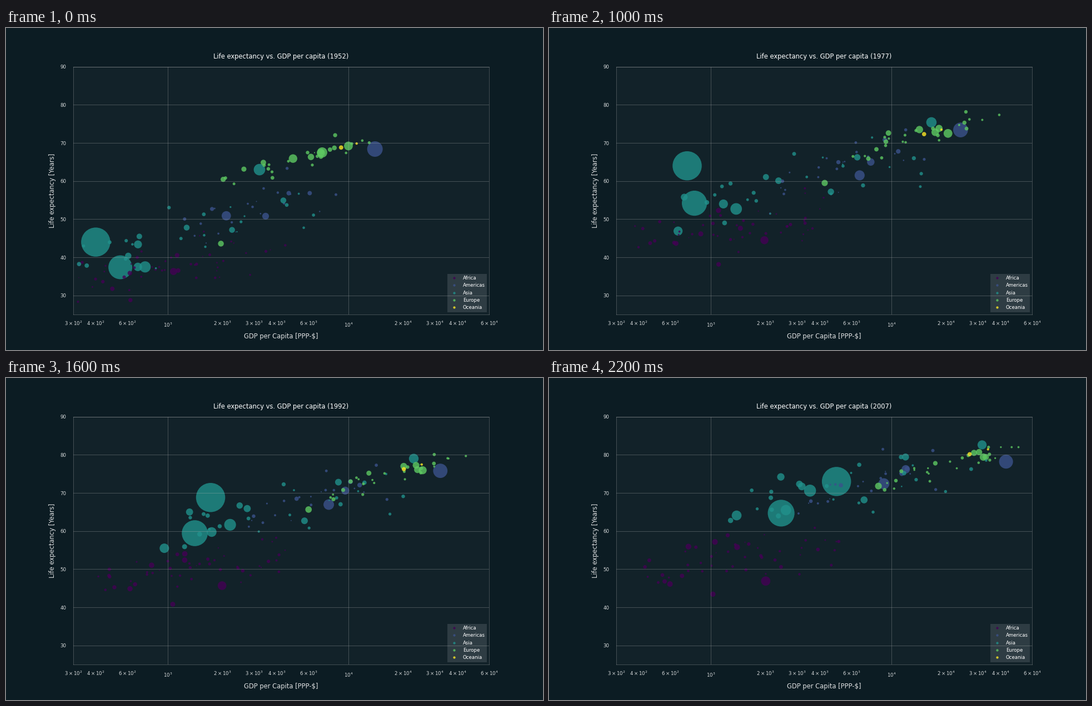
Recreate the animation shown at these times as a matplotlib script. Size 966 by 580 pixels, loop 2.4 s.

```python
import numpy as np
import matplotlib.pyplot as plt
from matplotlib.animation import FuncAnimation
from matplotlib.lines import Line2D
from matplotlib.ticker import FixedLocator, FuncFormatter

W, H, DPI = 966, 580, 69
STEPS = 12
MAX_AREA = 3000
ALPHA = 0.8
NAMES = ["Africa", "Americas", "Asia", "Europe", "Oceania"]
AF, AM, AS, EU, OC = range(5)
COLORS = plt.get_cmap("viridis")(np.linspace(0, 1, 5))

t = np.arange(STEPS)
largest = np.geomspace(556, 1319, STEPS)
group, xs, ys, areas = [], [], [], []


def track(kind, pops, income, age, knots=(0, 5, 11)):
    """Add a bubble whose log income and age run straight between knots."""
    group.append(kind)
    xs.append(10 ** np.interp(t, knots, np.log10(income)))
    ys.append(np.interp(t, knots, age))
    areas.append(MAX_AREA * np.geomspace(*pops, STEPS) / largest)


def cloud(kind, count, pop, growth, income, spread, age, slope, noise):
    """Scatter small bubbles around a drifting centre; richer means older."""
    rank = rng.permutation(np.linspace(-1.8, 1.8, count))
    for z in rank:
        start = pop * np.exp(np.clip(rng.normal(0, 0.9), -2, 1.5))
        drift = rng.normal(0, 0.3, 3)
        luck = rng.normal(0, 0.7) + rng.normal(0, 0.4, 3)
        logs = np.array(income) + spread * (z + drift)
        ages = np.array(age) + slope * z + noise * luck
        track(kind, (start, start * growth), 10 ** logs, np.minimum(ages, 82))


# The biggest bubble swings early on, so it has extra knots
track(AS, (556, 1319), (400, 576, 488, 613, 741, 2289, 4959),
      (44, 50.5, 44.5, 58.4, 64, 70.4, 73), (0, 1, 2, 3, 5, 9, 11))

# Populations, incomes and ages of the other large bubbles
LEADERS = [
    (AS, (372, 1110), (547, 813, 2452), (37.4, 54.2, 64.7)),
    (AM, (157.6, 301), (13990, 24073, 42952), (68.4, 73.4, 78.2)),
    (AS, (86.5, 127.5), (3217, 16610, 31656), (63, 75.4, 82.6)),
    (AS, (82, 223.5), (750, 1383, 3541), (37.5, 52.7, 70.6)),
    (EU, (69, 82.4), (7144, 20513, 32170), (67.5, 72.5, 79.4)),
    (AM, (56.6, 190), (2109, 6660, 9066), (50.9, 61.5, 72.4)),
    (EU, (50.4, 60.8), (9980, 17429, 33203), (69.2, 72.8, 79.4)),
    (EU, (47.7, 58), (4931, 14256, 28570), (65.9, 73.5, 80.5)),
    (AS, (46.9, 150), (684, 660, 1391), (37.5, 46.9, 64.1)),
    (EU, (42.5, 61), (7030, 18293, 30470), (67.4, 73.8, 80.7)),
    (AS, (41.3, 169), (685, 1176, 2606), (43.4, 54, 65.5)),
    (AF, (33, 135), (1077, 1982, 2014), (36.3, 44.5, 46.9)),
    (AM, (30, 109), (3478, 7675, 11978), (50.8, 65, 76.2)),
    (AS, (26.3, 85), (605, 714, 2442), (40.4, 55.8, 74.2)),
    (EU, (22.2, 71), (1969, 4269, 8458), (43.6, 59.5, 71.8)),
    (AS, (22.4, 91), (1273, 2373, 3190), (47.8, 60.1, 71.7)),
]
for leader in LEADERS:
    track(*leader)

rng = np.random.default_rng(7)
cloud(AF, 50, 3, 3.8, (3.0, 3.15, 3.15), 0.27, (39, 49, 54), 2.5, 5)
cloud(AM, 22, 3, 2.8, (3.5, 3.76, 3.87), 0.2, (53, 64, 73), 3.5, 4)
cloud(AS, 24, 5, 3.4, (3.17, 3.55, 3.8), 0.36, (47, 60, 71), 4, 5)
cloud(EU, 25, 6, 1.2, (3.72, 4.13, 4.33), 0.2, (65.5, 71.8, 77.5), 2.8, 1.6)
cloud(OC, 2, 5, 2.2, (4.01, 4.23, 4.47), 0.025, (69.2, 72.8, 80.7), 0.3, 0.3)

xs, ys, areas = np.array(xs), np.array(ys), np.array(areas)


def power_label(v, _=None):
    exp = int(np.floor(np.log10(v) + 1e-9))
    lead = round(v / 10 ** exp)
    base = "" if lead == 1 else rf"{lead}\times"
    return rf"$\mathdefault{{{base}10^{{{exp}}}}}$"


plt.rcParams.update({"font.family": "DejaVu Sans", "font.size": 9})
fig, ax = plt.subplots(figsize=(W / DPI, H / DPI), dpi=DPI, facecolor="#0c1c23")
fig.subplots_adjust(left=0.125, right=0.9, bottom=0.11, top=0.88)
ax.set_facecolor("#122229")
ax.set_xscale("log")
ax.set_xlim(300, 60000)
ax.set_ylim(25, 90)
ax.set_yticks(range(30, 91, 10))
ax.xaxis.set_major_locator(FixedLocator([1e3, 1e4]))
ax.xaxis.set_minor_locator(FixedLocator(
    [lead * 10 ** exp for exp in (2, 3, 4) for lead in (2, 3, 4, 6)][1:]))
ax.xaxis.set_major_formatter(FuncFormatter(power_label))
ax.xaxis.set_minor_formatter(FuncFormatter(power_label))
for which, pad in (("major", 13), ("minor", 9.5)):
    ax.tick_params(which=which, length=0, pad=pad, labelsize=9,
                   labelcolor="#d6d9da")
ax.grid(True, which="major", color="#bbbbbb", alpha=0.4, lw=0.8)
for spine in ax.spines.values():
    spine.set(color="#bbbbbb", alpha=0.4, linewidth=0.8)

ax.set_xlabel("GDP per Capita [PPP-$]", fontsize=12, labelpad=8, color="#dddfe0")
ax.set_ylabel("Life expectancy [Years]", fontsize=12, labelpad=8, color="#dddfe0")
title = ax.set_title("", fontsize=12, pad=15, color="white")

dots = ax.scatter(xs[:, 0], ys[:, 0], s=areas[:, 0], c=COLORS[group],
                  alpha=ALPHA, linewidths=0)
keys = [Line2D([], [], ls="", marker="o", ms=4.5, mew=0, color=c, alpha=ALPHA)
        for c in COLORS]
ax.legend(keys, NAMES, loc="lower right", fontsize=9, labelcolor="white",
          facecolor="white", edgecolor="none", framealpha=0.12, fancybox=False)


def update(i):
    dots.set_offsets(np.column_stack([xs[:, i], ys[:, i]]))
    dots.set_sizes(areas[:, i])
    title.set_text(f"Life expectancy vs. GDP per capita ({1952 + 5 * i})")
    return dots, title


anim = FuncAnimation(fig, update, frames=STEPS, interval=200, repeat=True,
                     repeat_delay=0)
plt.show()
```
